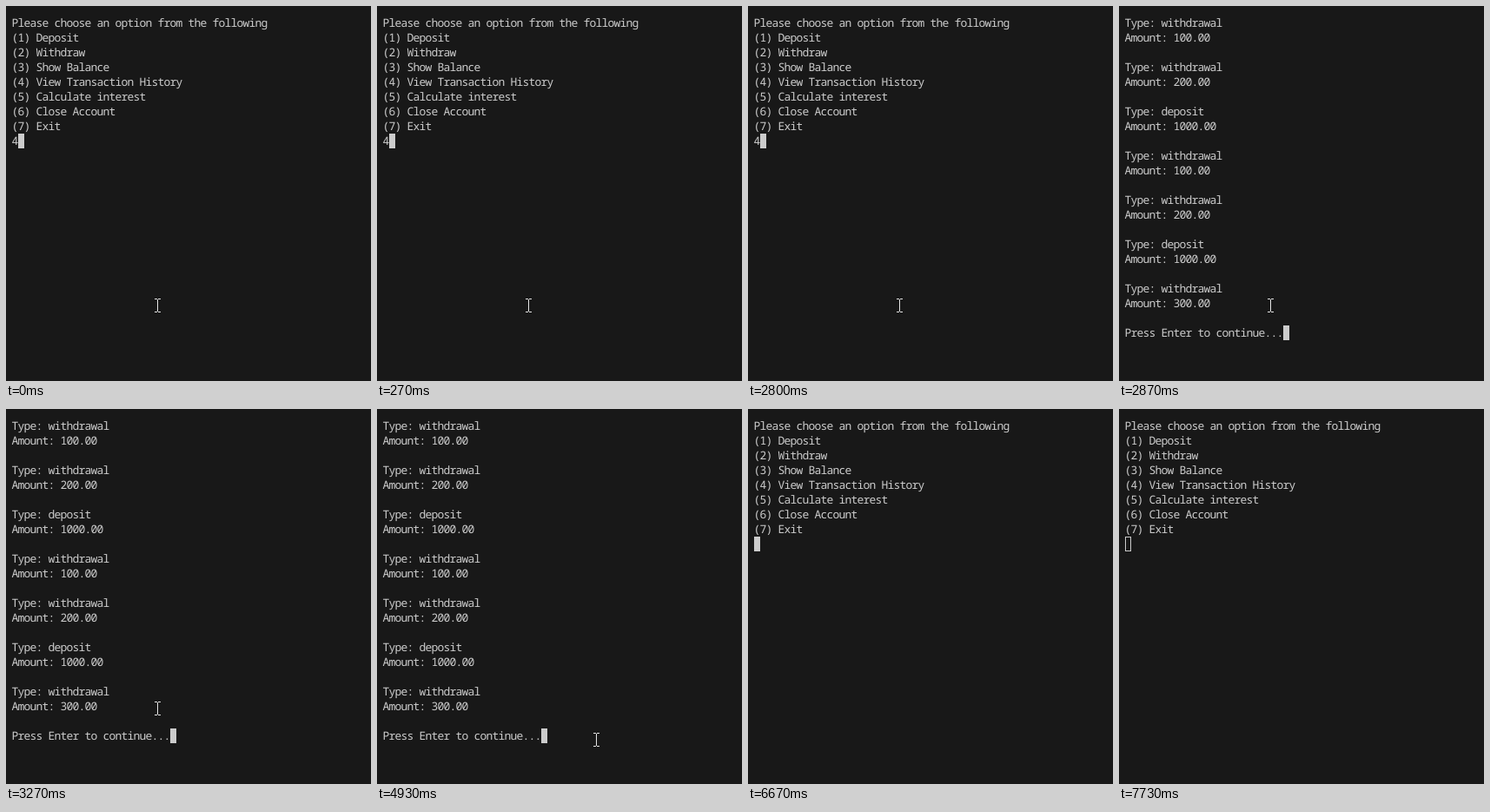
An HTML page that plays this animation: 420 px wide and 432 px high, repeating every 7.79 s.

```html
<!DOCTYPE html>
<html lang="en">
<head>
<meta charset="utf-8">
<title>Terminal banking menu</title>
<style>
  html, body { margin: 0; height: 100%; overflow: hidden; background: #181818; }
  svg { display: block; }
  text {
    font: 13px "Noto Sans Mono", "DejaVu Sans Mono", monospace;
    letter-spacing: -.8px;
    text-rendering: geometricPrecision;
    fill: #ccc;
    white-space: pre;
  }
</style>
</head>
<body>
<svg width="420" height="432" viewBox="0 0 420 432">
  <g id="menu"></g>
  <g id="history"></g>
  <text id="typed" x="6.6" y="160">4</text>
  <rect id="caret" width="6" height="16" stroke="#ccc"/>
  <path id="pointer" d="M-3 -7.5h3M1 -7.5h3M.5 -7v14M-3 7.5h3M1 7.5h3" stroke="#e6e6e6" fill="none"/>
</svg>
<script>
const LOOP = 7790, CELL = 7, ROW = 17;
const $ = id => document.getElementById(id);

const menu = ["Please choose an option from the following",
  ...["Deposit", "Withdraw", "Show Balance", "View Transaction History",
      "Calculate interest", "Close Account", "Exit"].map((name, i) => `(${i + 1}) ${name}`)];
const history = [-100, -200, 1000, -100, -200, 1000, -300].flatMap(n =>
  [`Type: ${n < 0 ? "withdrawal" : "deposit"}`, `Amount: ${Math.abs(n).toFixed(2)}`, ""]);
history.push("Press Enter to continue...");

function print(group, lines) {
  lines.forEach((line, i) => {
    const text = document.createElementNS("http://www.w3.org/2000/svg", "text");
    text.setAttribute("x", 6.6);
    text.setAttribute("y", 24 + ROW * i);
    text.textContent = line;
    group.append(text);
  });
}

const show = (id, on) => $(id).setAttribute("visibility", on ? "visible" : "hidden");

function placeCaret(col, row, filled) {
  $("caret").setAttribute("x", 7.5 + CELL * col);
  $("caret").setAttribute("y", 11.5 + ROW * row);
  $("caret").setAttribute("fill", filled ? "#ccc" : "none");
}

function draw(t) {
  const typed = t < 2870, listing = !typed && t < 5870;
  show("menu", !listing);
  show("history", listing);
  show("typed", typed);
  if (listing) placeCaret(26, 21, true);
  else placeCaret(typed ? 1 : 0, 8, t < 7670);

  const p = [4530, 4600, 4670, 4730].filter(step => t >= step).length / 4;
  const k = p * p * (3 - 2 * p);
  const x = Math.round(174 + 78 * k), y = Math.round(345 + 36 * k);
  $("pointer").setAttribute("transform", `translate(${x} ${y})`);
  show("pointer", t < 5930);
}

print($("menu"), menu);
print($("history"), history);
const start = performance.now();
function tick() {
  draw((performance.now() - start) % LOOP);
  requestAnimationFrame(tick);
}
tick();
</script>
</body>
</html>
```
